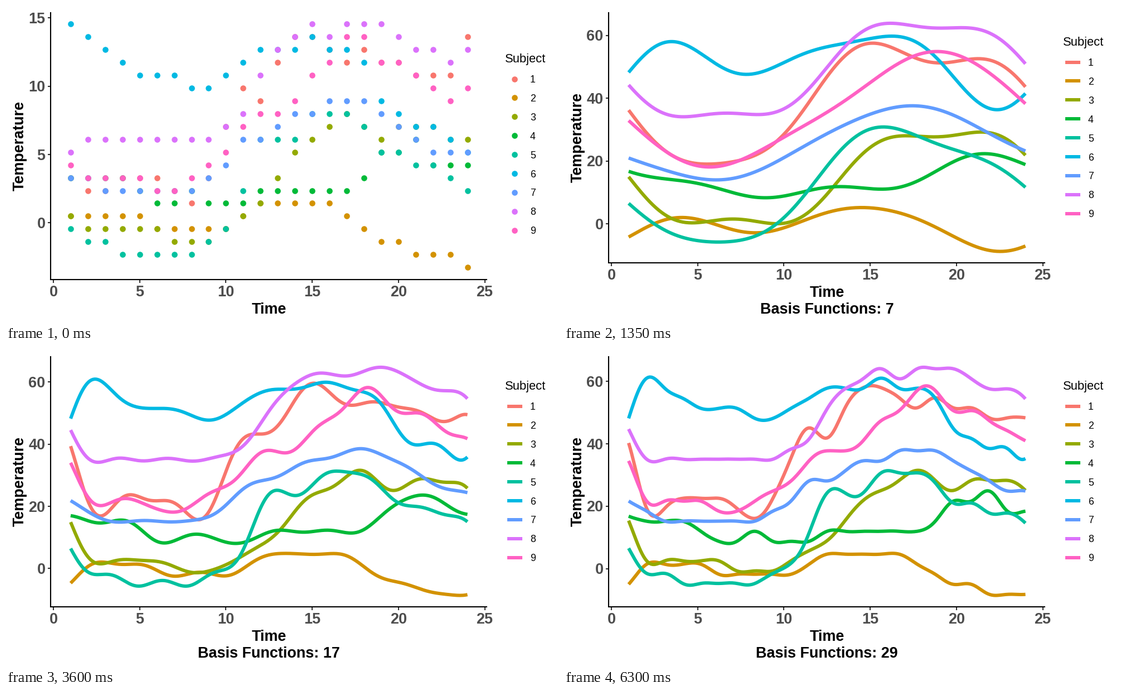
Animation of 990 by 566 pixels, one loop 6.55 s. Source, as a matplotlib script:

```python
import numpy as np
import matplotlib.pyplot as plt
from matplotlib.animation import FuncAnimation
from matplotlib.patches import Rectangle

W, H = 990, 566
LEFT, RIGHT, TOP = 80.4, 863, 10.5
STEP_MS, STEPS_PER_STATE, HOLD_STEPS = 50, 9, 5
SIZES = range(3, 30, 2)
HOURS = np.arange(1, 25)
CURVE_HOURS = np.linspace(1, 23, 265)
CURVE_X = np.linspace(1, 24, 265)

plt.rcParams["font.family"] = "Liberation Sans"

subjects = []


def subject(color, offset, *levels):
    subjects.append((color, offset, np.array(levels)))


# colour, curve offset, hourly reading level
subject("#F8766D", 12.85, 3, 2, 2, 3, 3, 3, 2, 1, 3, 7, 10, 9,
        12, 14, 14, 13, 12, 13, 12, 12, 11, 11, 11, 14)
subject("#D39200", 1.4, 0, 0, 0, 0, 0, -1, -1, -1, -1, -1, 0, 1,
        1, 1, 1, 1, 0, -1, -2, -2, -3, -3, -3, -4)
subject("#93AA00", 5.7, 0, -1, -1, -1, -1, -1, -2, -2, -2, -1, 0, 1,
        3, 5, 6, 7, 8, 7, 6, 7, 7, 7, 6, 6)
subject("#00BA38", 5.5, 3, 3, 3, 3, 2, 1, 1, 2, 1, 1, 1, 2,
        2, 2, 2, 2, 2, 3, 5, 5, 6, 4, 4, 4)
subject("#00C19F", 4.9, -1, -2, -2, -3, -3, -3, -3, -3, -2, -1, 2, 6,
        6, 6, 8, 8, 8, 7, 5, 5, 4, 4, 3, 2)
subject("#00B9E3", 15.9, 15, 14, 13, 12, 11, 11, 11, 10, 10, 11, 12, 13,
        13, 13, 14, 13, 13, 12, 9, 8, 7, 7, 6, 5)
subject("#619CFF", 8.75, 3, 3, 2, 2, 2, 2, 2, 2, 3, 4, 6, 6,
        7, 8, 8, 9, 9, 9, 8, 7, 6, 5, 5, 5)
subject("#DB72FB", 15.7, 5, 6, 6, 6, 6, 6, 6, 6, 6, 7, 8, 11,
        13, 14, 15, 14, 15, 15, 15, 14, 13, 13, 12, 13)
subject("#FF61C3", 11.95, 4, 3, 3, 3, 3, 2, 2, 3, 4, 5, 7, 8,
        8, 9, 11, 12, 14, 14, 12, 12, 11, 10, 9, 10)


def fourier(hours, size):
    angle = 2 * np.pi * (hours - 1) / 23
    columns = [np.ones(len(hours))]
    for k in range(1, size // 2 + 1):
        columns += [np.sin(k * angle), np.cos(k * angle)]
    return np.column_stack(columns)


def smooth(values, size):
    """Least-squares Fourier fit with a very light roughness penalty."""
    basis = fourier(HOURS, size)
    order = (np.arange(size) + 1) // 2
    penalty = np.diag(1e-8 * order.astype(float) ** 4)
    coef = np.linalg.solve(basis.T @ basis + penalty, basis.T @ values)
    return fourier(CURVE_HOURS, size) @ coef


def to_x(time):
    return 85 + 30.94 * time


def make_axes():
    ax = fig.add_axes([0, 0, 1, 1])
    ax.axis("off")
    ax.set(xlim=(0, W), ylim=(H, 0))
    ax.add_patch(Rectangle((0, 0), W, H, color="white", lw=0, zorder=-5))
    return ax


def draw_state(series, y_ticks, bottom, size=None):
    ax = make_axes()
    low, high = np.min(series), np.max(series)
    pad = (bottom - TOP) * 0.05 / 1.1

    def to_y(value):
        return bottom - pad - (value - low) / (high - low) * (bottom - TOP - 2 * pad)

    def line(xs, ys, color="black", lw=2.1):
        ax.plot(xs, ys, color=color, lw=lw, solid_capstyle="butt")

    def bold(x, y, text, color="black", ha="center", **kw):
        ax.text(x, y, text, size=27, weight="bold", color=color, ha=ha,
                va="baseline", **kw)

    def dots(xs, ys, color):
        ax.plot(xs, ys, "o", color=color, ms=10.6, mew=0)

    legend_y = bottom - 359.5
    ax.text(895, legend_y - 30, "Subject", size=22, va="baseline")
    for i, ((color, *_), values) in enumerate(zip(subjects, series)):
        key_y = legend_y + 33.93 * i
        if size:
            line(to_x(CURVE_X), to_y(values), color, 6)
            line([898.5, 925.5], [key_y, key_y], color, 6)
        else:
            dots(to_x(HOURS), to_y(values), color)
            dots([912], [key_y], color)
        ax.text(940, key_y + 6.4, str(i + 1), size=17.6, va="baseline")

    for tick in range(0, 26, 5):
        x = to_x(tick)
        line([x, x], [bottom, bottom + 5.5], "#333333")
        bold(x, bottom + 30.3, str(tick), "#4D4D4D")
    for tick in y_ticks:
        y = to_y(tick)
        line([LEFT - 5.5, LEFT], [y, y], "#333333")
        bold(70.7, y + 9.8, str(tick), "#4D4D4D", ha="right")
    line([LEFT, LEFT], [TOP, bottom + 1])
    line([LEFT - 1, RIGHT], [bottom, bottom])

    middle = (LEFT + RIGHT) / 2
    bold(31.5, (TOP + bottom) / 2, "Temperature", rotation=90,
         rotation_mode="anchor")
    bold(middle, bottom + 61, "Time")
    if size:
        bold(middle, bottom + 91, f"Basis Functions: {size}")
    return ax


fig = plt.figure(figsize=(W / 72, H / 72), dpi=72, facecolor="white")

readings = [0.47 + 0.939 * levels for _, _, levels in subjects]
states = [draw_state(readings, range(0, 16, 5), 490)]
for size in SIZES:
    curves = [smooth(offset + 3.22 * levels, size)
              for _, offset, levels in subjects]
    states.append(draw_state(curves, range(0, 61, 20), 460, size))


def fader(weight):
    def apply(image, dpi):
        return image * [1, 1, 1, weight], 0, 0
    return apply


def update(frame):
    index, step = divmod(frame, STEPS_PER_STATE)
    for ax in states:
        ax.set_visible(False)
        ax.set_agg_filter(None)
    states[index].set_visible(True)
    if step >= HOLD_STEPS:
        # two dissolve steps lead into the next chart
        weight = (1 + (step - HOLD_STEPS) // 2) / 3
        states[index + 1].set_visible(True)
        states[index + 1].set_agg_filter(fader(weight))
    return states


FRAMES = (len(states) - 1) * STEPS_PER_STATE + HOLD_STEPS
anim = FuncAnimation(fig, update, frames=FRAMES, interval=STEP_MS,
                     repeat=True, repeat_delay=0, blit=False)
plt.show()
```
